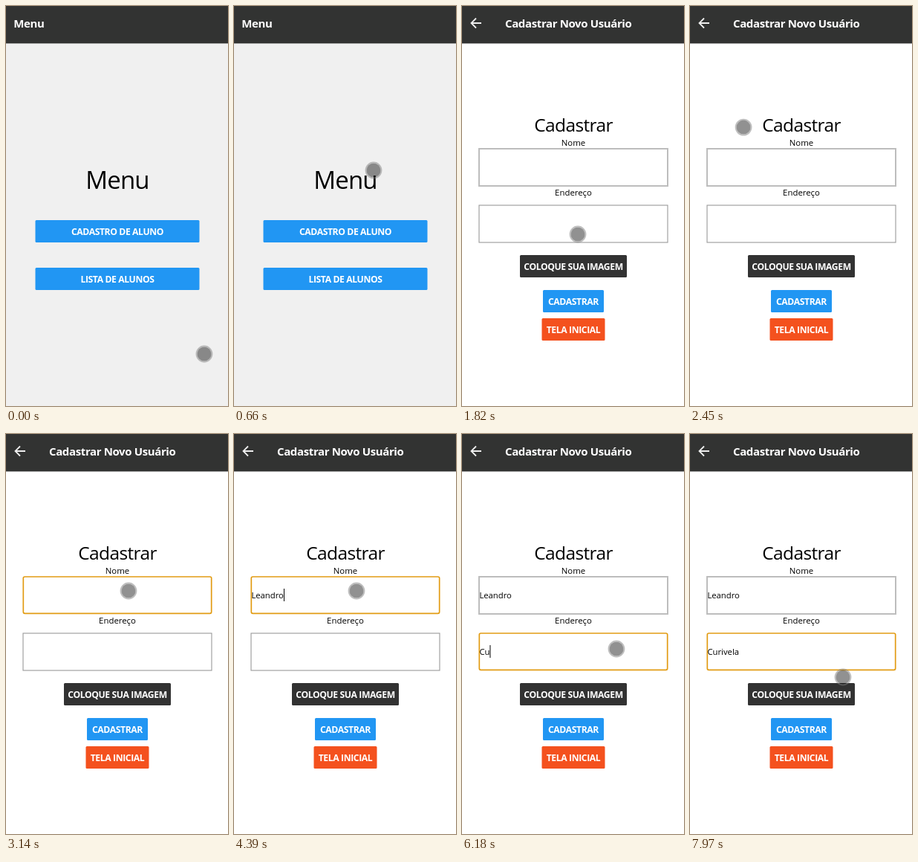
Recreate the animation shown at these times as an HTML page. Size 299x538 px, loop 8000 ms.

```html
<!DOCTYPE html>
<html lang="pt">
<head>
<meta charset="utf-8">
<style>
  html, body { margin: 0; width: 100%; height: 100%; overflow: hidden; background: #fff; }
  svg { display: block; width: 299px; height: 538px; font-family: "Open Sans", "Noto Sans", sans-serif; }
  .title { fill: #fff; font-weight: 700; font-size: 15px; letter-spacing: -.025em; }
  .heading { letter-spacing: -.025em; }
  .button { fill: #fff; font-weight: 650; font-size: 12.2px; letter-spacing: -.033em; }
  .label { font-size: 11.4px; }
  .heading, .label, .button { text-anchor: middle; }
  .field rect { fill: #fff; }
  .field text { font-size: 11.3px; }
</style>
</head>
<body>
<svg viewBox="0 0 299 538">
  <defs>
    <g id="bar">
      <rect width="299" height="50" fill="#323332"/>
      <rect y="50" width="299" height="1" fill="#aaa"/>
    </g>
  </defs>
  <g id="menu">
    <rect width="299" height="538" fill="#f0f0f0"/>
    <use href="#bar"/>
    <text class="title" x="10.2" y="29">Menu</text>
    <text class="heading" x="150" y="246" font-size="33">Menu</text>
  </g>
  <g id="form">
    <rect width="299" height="538" fill="#fff"/>
    <use href="#bar"/>
    <path d="M26 23H12.5M19 16.5L12.5 23l6.5 6.5" fill="none" stroke="#eee" stroke-width="1.8"/>
    <text class="title" x="58" y="29">Cadastrar Novo Usuário</text>
    <text class="heading" x="150" y="169" font-size="24.5">Cadastrar</text>
    <text class="label" x="150" y="188">Nome</text>
    <text class="label" x="150" y="255">Endereço</text>
  </g>
  <g id="pointer">
    <circle r="9.5" fill="#000" fill-opacity=".43"/>
    <circle r="10.4" fill="none" stroke="#808080" stroke-opacity=".5" stroke-width="2"/>
  </g>
</svg>
<script>
const LOOP = 8000;
const menu = document.getElementById("menu");
const form = document.getElementById("form");
const pointer = document.getElementById("pointer");

const clamp = v => Math.min(1, Math.max(0, v));
const progress = (t, from, to) => clamp((t - from) / (to - from));
const smooth = u => u * u * (3 - 2 * u);

function set(node, attrs) {
  for (const key in attrs) node.setAttribute(key, attrs[key]);
}

function add(parent, tag, attrs, text = "") {
  const node = document.createElementNS("http://www.w3.org/2000/svg", tag);
  set(node, attrs);
  node.textContent = text;
  return parent.appendChild(node);
}

function button(parent, label, y, width, fill) {
  add(parent, "rect", { x: 150 - width / 2, y, width, height: 30, rx: 1.5, fill });
  add(parent, "text", { class: "button", x: 150, y: y + 19.6 }, label);
}

button(menu, "CADASTRO DE ALUNO", 288, 221, "#2196f3");
button(menu, "LISTA DE ALUNOS", 352, 221, "#2196f3");
button(form, "COLOQUE SUA IMAGEM", 335, 144, "#323232");
button(form, "CADASTRAR", 382, 82, "#2196f3");
button(form, "TELA INICIAL", 420, 85, "#f4511e");

function field(y, options) {
  const group = add(form, "g", { class: "field" });
  return {
    ...options,
    box: add(group, "rect", { y }),
    text: add(group, "text", { x: 23.4, y: y + 29 }),
    caret: add(group, "rect", { y: y + 16, width: 1, height: 17, style: "fill:#000" })
  };
}

// letters appear evenly from `first` to `last`
const fields = [
  field(192, { value: "Leandro", border: "#bdbdbd", weight: 2, focus: 2640, first: 3520, last: 4390, blur: 5370 }),
  field(268, { value: "Curivela", border: "#999", weight: 1.1, focus: 5370, first: 5950, last: 7340, blur: LOOP })
];

function drawField(f, t) {
  const step = (f.last - f.first) / (f.value.length - 1);
  const count = t < f.first ? 0 : Math.min(f.value.length, 1 + Math.floor((t - f.first) / step));
  const lastKey = count ? f.first + (count - 1) * step : f.focus;
  const focused = t >= f.focus && t < f.blur;
  const caretOn = focused && (t - lastKey) % 1000 < 490;
  const inset = focused ? 0.3 : 0;
  set(f.box, {
    x: 23 + inset, width: 254 - 2 * inset, height: focused ? 49.3 : 50, rx: focused ? 2 : 0,
    stroke: focused ? "#e29c14" : f.border, "stroke-width": focused ? 1.7 : f.weight
  });
  f.text.textContent = f.value.slice(0, count);
  set(f.caret, {
    x: count ? 23.4 + f.text.getComputedTextLength() : 24,
    visibility: caretOn ? "visible" : "hidden"
  });
}

// each move: start and end time, bend of the curve, end point
const moves = [
  { from: 40, to: 510, bend: [188, 30], end: [188, 221] },
  { from: 780, to: 1290, bend: [270, 125], end: [171, 317] },
  { from: 1290, to: 1590, bend: [76, 305], end: [156, 307] },
  { from: 2020, to: 2760, bend: [-30, 80], end: [165, 211] },
  { from: 4850, to: 5490, bend: [180, 240], end: [208, 289] },
  { from: 7850, to: 7970, bend: [208, 308], end: [206, 327] }
];

function pointerAt(t) {
  let point = [267, 468];
  for (const { from, to, bend, end } of moves) {
    const u = smooth(progress(t, from, to)), v = 1 - u;
    point = point.map((p, i) => v * v * p + 2 * u * v * bend[i] + u * u * end[i]);
  }
  return point;
}

function draw(t) {
  form.setAttribute("opacity", progress(t, 1630, 1810));
  fields.forEach(f => drawField(f, t));
  pointer.setAttribute("transform", `translate(${pointerAt(t)})`);
}

const start = performance.now();
function tick() {
  draw((performance.now() - start) % LOOP);
  requestAnimationFrame(tick);
}
tick();
</script>
</body>
</html>
```
